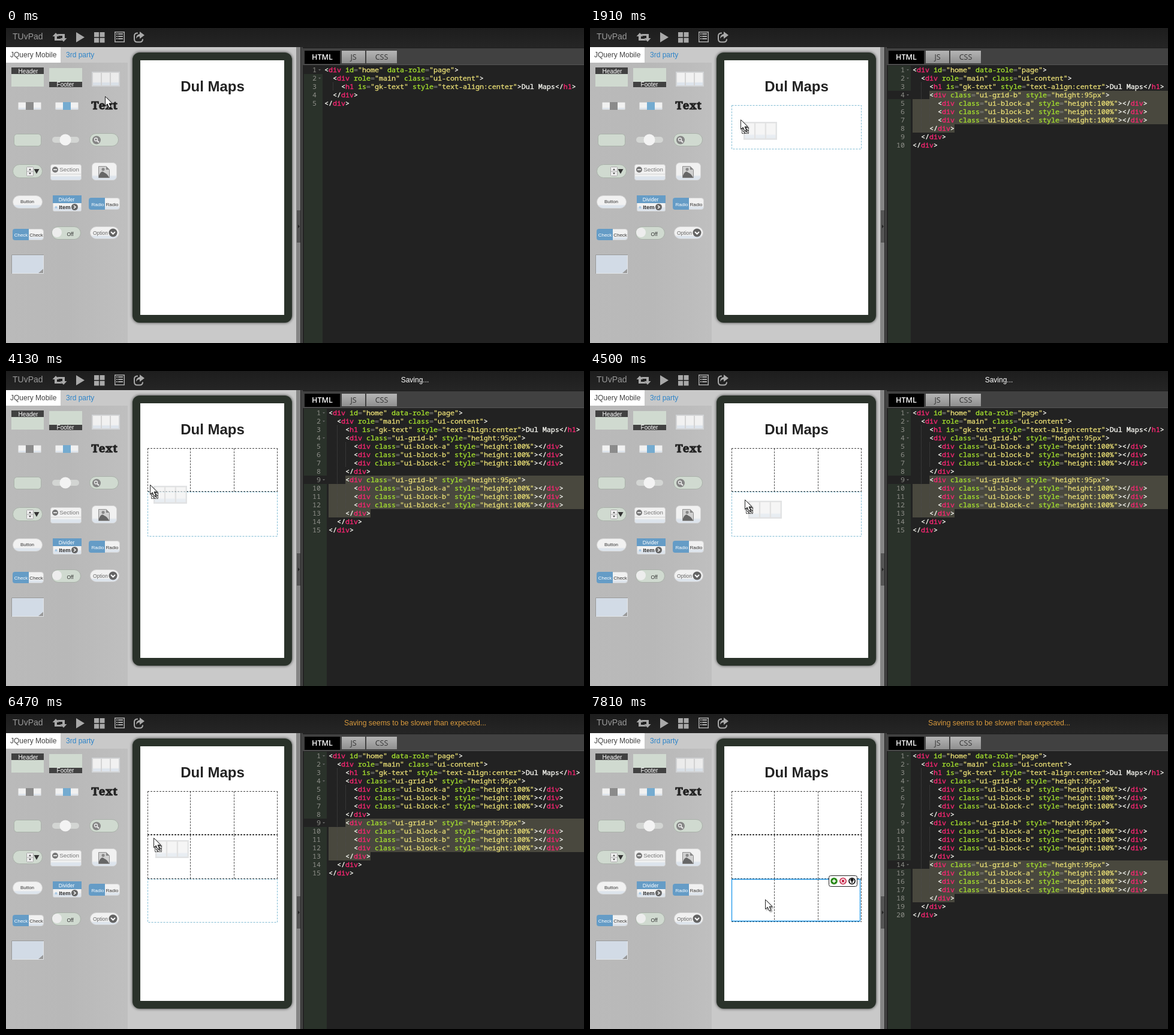
These frames come from a looping animation (964 by 527 pixels, 8 s). An HTML page:

```html
<!DOCTYPE html>
<html lang="en">
<head>
<meta charset="utf-8">
<title>App builder</title>
<style>
  html, body { margin: 0; width: 100%; height: 100%; overflow: hidden; background: #222; }
  svg { display: block; }
  text { font-family: "Liberation Sans", Arial, sans-serif; font-size: 12px; white-space: pre; }
  .mid { text-anchor: middle; }
  .small text { font-size: 8px; text-anchor: middle; fill: #333; }
  .small .light { fill: #fff; }
  .field { fill: #d0dad0; stroke: #a9b1a9; }
  .plate { fill: url(#plate); stroke: #d4d4d4; }
  .blue { fill: #659cc6; }
  .dark { fill: #414141; }
  .tab { font: 12.5px "Open Sans", "DejaVu Sans", sans-serif; }
  .code text { --ink: #f8f8f2; font: 11.667px "Noto Sans Mono", "DejaVu Sans Mono", monospace; }
  .code text, .code tspan { fill: var(--ink); stroke: var(--ink); stroke-width: .35px; }
  .code .num { --ink: #8f908a; stroke: none; text-anchor: end; }
  .code .tag { --ink: #f92672; }
  .code .attr { --ink: #a6e22e; }
  .code .eq { --ink: #858580; }
  .code .str { --ink: #e6db74; }
  .dash { fill: none; stroke: #444; stroke-dasharray: 3 2; }
  .preview { fill: none; stroke: #80bbd3; stroke-dasharray: 3 2; }
</style>
</head>
<body>
<svg width="964" height="527" viewBox="0 0 964 527">
  <defs>
    <linearGradient id="plate" x2="0" y2="1">
      <stop offset=".7" stop-color="#f1f1f1"/><stop offset=".8" stop-color="#dde4ec"/>
    </linearGradient>
    <linearGradient id="panel" x2="1" y2="0">
      <stop stop-color="#bababa"/><stop offset=".5" stop-color="#b8b8b8"/><stop offset="1" stop-color="#bfbfbf"/>
    </linearGradient>
    <linearGradient id="bar" x2="0" y2="1">
      <stop stop-color="#1d1d1d"/><stop offset="1" stop-color="#252525"/>
    </linearGradient>
    <linearGradient id="button" x2="0" y2="1">
      <stop stop-color="#b5b5b5"/><stop offset="1" stop-color="#8f8f8f"/>
    </linearGradient>
    <filter id="shadow" x="-20%" y="-20%" width="150%" height="150%">
      <feDropShadow dx="0" dy="0" stdDeviation="2.5" flood-opacity=".75"/>
    </filter>
    <filter id="soft" x="-30%" y="-30%" width="180%" height="180%">
      <feDropShadow dx="2" dy="2" stdDeviation="1.2" flood-opacity=".45"/>
    </filter>
    <g id="columns">
      <path d="M0 0h47v25H0z" fill="#d0d3d6"/>
      <path class="plate" d="M1.5 1.5h14v22h-14zM16.5 1.5h14v22h-14zM31.5 1.5h14v22h-14z"/>
    </g>
  </defs>

  <!-- Widget palette -->
  <path d="M203 31h282v496H203z" fill="#c9c9c9"/>
  <path d="M0 31h203v496H0z" fill="url(#panel)"/>
  <path d="M91 32h112v26H91z" fill="#c9c9c9"/>
  <path d="M0 32h91v26H0z" fill="#fff"/>
  <text x="7" y="49" fill="#444">JQuery Mobile</text>
  <text x="100" y="49" fill="#2f85c9">3rd party</text>

  <!-- Top bar -->
  <path d="M0 0h964v32H0z" fill="url(#bar)"/>
  <text x="11" y="19" fill="#9a9a9a" style="font-size:14px">TUvPad</text>
  <g fill="#a9a9a9">
    <path d="M83 8l-5.5 6H81v7h13l-3-3h-6v-4h3.5zM96 23l5.5-6H98v-7H85l3 3h6v4h-3.5z"/>
    <path d="M117 7l14 8.5-14 8.5z"/>
    <path d="M147 7h8v8h-8zM156.5 7h8v8h-8zM147 16.5h8v8h-8zM156.5 16.5h8v8h-8z"/>
    <path d="M181 6h17v18h-17zM182.5 7.5v15h14v-15z" fill-rule="evenodd"/>
    <path d="M184 9h2v2h-2zM187 9h8v2h-8zM184 13h2v2h-2zM187 13h8v2h-8zM184 17h2v2h-2zM187 17h8v2h-8z"/>
    <path d="M223 6l8 6-8 6v-4q-4 0-6 4 0-7 6-8z"/>
    <path d="M220 8.5h-2q-4 1-4 5v5q0 5 5 5h4q5 0 5-5" fill="none" stroke="#a9a9a9" stroke-width="2"/>
  </g>

  <g class="small">
    <path d="M9 66h54v32H9zM72 67h55v31H72z" fill="#d0dad0"/>
    <path class="dark" d="M9 66h54v11H9zM72 90h55v9H72z"/>
    <text class="light" x="37" y="76" style="font-size:10px">Header</text>
    <text class="light" x="99" y="98" style="font-size:10px">Footer</text>

    <rect class="plate" x="20.5" y="124.5" width="38" height="12" rx="1"/>
    <rect class="plate" x="82.5" y="124.5" width="38" height="12" rx="1"/>
    <path d="M33 124h13v13H33z" fill="#8b8b8b"/>
    <path d="M95 124h13v13H95z" fill="#74abd0"/>
    <text x="164.5" y="136" style="font:900 18.5px 'Noto Serif','DejaVu Serif',serif;fill:#222;stroke:#222;letter-spacing:.6px">Text</text>

    <rect class="field" x="13.5" y="177.5" width="45" height="20" rx="5"/>
    <rect x="77" y="182" width="45" height="10" rx="5" fill="#d3d5d3"/>
    <circle cx="99" cy="187" r="9.5" fill="#f3f3f3"/>
    <rect class="field" x="139.5" y="176.5" width="48" height="21" rx="10.5"/>
    <circle cx="151" cy="187.5" r="7" fill="#858585"/>
    <path d="M152 188.5l3 3" stroke="#eee" stroke-width="2"/>
    <circle cx="150" cy="186.5" r="2.5" fill="none" stroke="#eee" stroke-width="1.3"/>

    <rect class="field" x="11.5" y="228.5" width="49" height="22" rx="11"/>
    <rect x="34.5" y="232.5" width="11" height="15" rx="1" fill="#eee" stroke="#aaa"/>
    <path d="M34 240h12" stroke="#aaa"/>
    <path d="M38 238l2-3 2 3zM38 242l2 3 2-3z" fill="#555"/>
    <path d="M46.5 236h9l-4.5 8z" fill="#333"/>
    <rect class="plate" x="74.5" y="228.5" width="51" height="26" rx="3"/>
    <path d="M75 244.5h50" stroke="#d4d4d4"/>
    <circle cx="82" cy="237" r="5" fill="#777"/>
    <path d="M79 237h6" stroke="#fff" stroke-width="1.5"/>
    <text x="105.5" y="240" style="font-size:9.8px;fill:#777">Section</text>
    <rect class="plate" x="143.5" y="225.5" width="41" height="29" rx="6"/>
    <path d="M154.5 231.5h12l6 6v13h-18z" fill="#d0d0d0" stroke="#8f8f8f"/>
    <path d="M155 250v-3q4-10 9-5 4 1 8 8z" fill="#666"/>
    <circle cx="162" cy="236.5" r="2.5" fill="#888"/><path d="M167 231v6h6z" fill="#888"/>

    <rect class="plate" x="11.5" y="280.5" width="49" height="21" rx="10.5"/>
    <text x="35.5" y="293">Button</text>
    <rect class="plate" x="78.5" y="280.5" width="47" height="26" rx="2"/>
    <path class="blue" d="M78 280h48v13H78z"/>
    <text class="light" x="101" y="290" style="font-size:8.5px">Divider</text>
    <circle cx="83.5" cy="300" r="2" fill="#a9c9e4"/>
    <text x="98" y="303" style="font-size:9.5px;font-weight:bold">Item</text>
    <circle cx="114.5" cy="299.5" r="5.5" fill="#666"/>
    <path d="M113 297l3 2.5-3 2.5" fill="none" stroke="#fff" stroke-width="1.5"/>
    <rect class="plate" x="138.5" y="284.5" width="51" height="19" rx="4"/>
    <path class="blue" d="M165 284v20h-23q-4 0-4-4v-12q0-4 4-4z"/>
    <text class="light" x="153" y="298">Radio</text><text x="177" y="298">Radio</text>

    <rect class="plate" x="11.5" y="336.5" width="51" height="18" rx="4"/>
    <path class="blue" d="M38 336v19H15q-4 0-4-4v-11q0-4 4-4z"/>
    <text class="light" x="25" y="349">Check</text><text x="50.5" y="349">Check</text>
    <rect class="field" x="76.5" y="332.5" width="48" height="21" rx="10.5"/>
    <circle cx="85" cy="342" r="8" fill="#ededed"/>
    <text x="107" y="348" style="font-size:8.5px">Off</text>
    <rect class="plate" x="140.5" y="332.5" width="48" height="20" rx="10"/>
    <text x="157.5" y="346" style="font-size:8.5px;fill:#666">Option</text>
    <circle cx="178.5" cy="342.5" r="7" fill="#646464"/>
    <path d="M175 341l3.5 3.5 3.5-3.5" fill="none" stroke="#fff" stroke-width="2"/>

    <path d="M9.5 379.5h53v31h-53z" fill="#d2dbe6" stroke="#e2e5e8"/>
    <path d="M9.5 411v-31.5H63" fill="none" stroke="#999"/>
    <path d="M62 403v7h-8z" fill="#999"/>
  </g>

  <!-- Phone -->
  <rect x="211" y="41" width="266" height="452" rx="12" fill="#29332a" filter="url(#shadow)"/>
  <path d="M224 54h240v426H224z" fill="#fff"/>
  <text class="mid" x="344.5" y="106" fill="#222" style="font-size:24px;font-weight:bold">Dul Maps</text>

  <!-- Splitter and editor -->
  <path d="M484 32h7v495h-7z" fill="#858585"/>
  <path d="M485 305h6v54h-6z" fill="#555"/>
  <path d="M487 329l3 3-3 3z" fill="#222"/>
  <path d="M491 32h473v495H491z" fill="#222"/>
  <path d="M492 32h3v495h-3z" fill="#444"/>
  <path d="M495 34h469v28H495z" fill="#414141"/>
  <path d="M498 38h59v22h-59z" fill="#000"/>
  <path d="M560 38h39v21h-39zM601 38h51v21h-51z" fill="url(#button)"/>
  <text class="tab mid" x="527.5" y="53" fill="#fff" style="font-weight:600">HTML</text>
  <text class="tab mid" x="579.5" y="53" fill="#333">JS</text>
  <text class="tab mid" x="626.5" y="53" fill="#333">CSS</text>
  <path d="M496 61.5h468" stroke="#555"/>

  <g class="code" id="code"></g>
  <g id="stage"></g>
</svg>
<script>
const LOOP = 8000, FRAME = 60;
// One entry per dropped grid, in ms; dx and dy place the drag image.
const drops = [
  { drag: 1490, preview: 1790, code: 1850, drop: 2500, select: 2560, dx: 5, dy: 4 },
  { drag: 3770, preview: 4010, code: 4070, drop: 5100, select: 5220, dx: 6, dy: 2 },
  { drag: 6170, preview: 6410, code: 6530, drop: 7680, select: 7810, dx: 3, dy: 4 },
];
// Pointer path: time, x, y
const path = [
  [0, 165, 114], [540, 165, 114], [840, 167, 89], [1430, 167, 89], [1970, 262, 161],
  [2830, 262, 161], [3070, 204, 106], [3430, 182, 94], [3710, 182, 94], [4130, 240, 190],
  [4490, 258, 215], [5550, 258, 215], [5910, 184, 89], [6110, 184, 89], [6470, 246, 207],
  [6950, 291, 286], [7030, 291, 286], [7150, 292, 310], [LOOP, 292, 310],
];
const moveStarts = [0, 600, 1370, 2890, 3770, 5550, 6170, 7090];
const tops = [129, 202, 276, 348];

const escape = s => s.replace(/</g, '&lt;');
const span = (cls, s) => `<tspan class="${cls}">${s}</tspan>`;
const TOKEN = /(<\/?)(\w+)|("[^"]*")|([\w-]+)(?==)|(=)/g;
const highlight = line => line.replace(TOKEN, (all, open, tag, str, attr) =>
  tag ? escape(open) + span('tag', tag) : str ? span('str', str) : attr ? span('attr', attr) : span('eq', '='));

function source(count) {
  const grid = ['    <div class="ui-grid-b" style="height:95px">',
    ...['a', 'b', 'c'].map(c => `      <div class="ui-block-${c}" style="height:100%"></div>`),
    '    </div>'];
  return ['<div id="home" data-role="page">', '  <div role="main" class="ui-content">',
    '    <h1 is="gk-text" style="text-align:center">Dul Maps</h1>',
    ...Array(count).fill(grid).flat(), '  </div>', '</div>'];
}

function drawCode(count) {
  const lines = source(count), wide = lines.length > 9 ? 7 : 0, left = 531 + wide;
  const first = count ? 5 * count - 2 : 0;
  const box = (x, row, w, h, fill) =>
    `<rect x="${x}" y="${63 + 14 * row}" width="${w}" height="${14 * h}" fill="${fill}"/>`;
  let out = `<rect x="497" y="63" width="${31 + wide}" height="464" fill="#2a322a"/>`
    + box(497, first, 31 + wide, 1, '#222');
  if (count) {
    out += box(left + 28, first, 964, 1, '#49483e') + box(left, first + 1, 964, 3, '#49483e')
      + box(left, first + 4, 70, 1, '#49483e');
  }
  lines.forEach((line, row) => {
    const y = 74 + 14 * row, indent = line.search(/\S/);
    for (let k = 2; k < indent; k += 2) {
      out += `<path d="M${left + 7 * k + .5} ${y - 11}v14" stroke="#4a4a4a" stroke-dasharray="1 1"/>`;
    }
    out += `<text class="num" x="${518 + wide}" y="${y}">${row + 1}</text>`
      + `<text x="${left + 7 * indent}" y="${y}">${highlight(line.trim())}</text>`;
    if (row < 2 || /grid/.test(line)) out += `<path d="M${521 + wide} ${y - 5}h4l-2 2.5z" fill="#666"/>`;
  });
  return out;
}

function drawGrid(i) {
  const top = tops[i] + .5, bottom = tops[i + 1] - .5;
  return `<path class="dash" d="M236 ${top}h217M236 ${bottom}h217`
    + [236, 307, 380, 452].map(x => `M${x + .5} ${top}V${bottom}`).join('') + '"/>';
}

function drawSelection(i) {
  const y = tops[i], icons = [['#2d8a1c', 'M-3 0h6M0-3v6'], ['#c2183c', 'M-2-2l4 4M2-2l-4 4'], ['#000', 'M0 3v-6M-2.5-1L0-3.5 2.5-1']];
  return `<rect x="236.5" y="${y + .5}" width="214" height="${tops[i + 1] - y - 2}" rx="1" fill="none" stroke="#1c97ea" stroke-width="1.3"/>
    <rect x="398.5" y="${y - 5.5}" width="47" height="18" rx="3" fill="#fff" stroke="#222"/>`
    + icons.map(([color, mark], k) => `<g transform="translate(${407 + 15 * k} ${y + 3.5})">
      <circle r="5" fill="${k ? '#fff' : color}" stroke="${color}" stroke-width="1.6"/>
      <path d="${mark}" fill="none" stroke="${k ? color : '#fff'}" stroke-width="1.8"/></g>`).join('');
}

const ARROW = `<path d="M.5 .5v16l3.7-3.5 2.7 6.3 2.8-1.2-2.7-6H12z" fill="#fff" stroke="#222" filter="url(#soft)"/>`;
const HAND = `<path d="M-2 12V2q0-2 1.5-2T1 2v5q2-1.5 3 .5 2-1 3 .8 3-.8 3 2v5q0 3-2 4v2H-1v-2l-5-7q-.5-2.5 1.5-2z" fill="#fff" stroke="#111" filter="url(#soft)"/>
  <path d="M1.5 13v4M4 13v4M6.5 13v4" stroke="#111"/>`;
const BADGE = `<path d="M2.5 13.5h11v10h-11z" fill="#fff" stroke="#111" stroke-dasharray="2 1"/>
  <path d="M4 15l8 7M4 19l4 4M8 15l5 4" stroke="#333" stroke-width="1.3"/>`;

function pointerAt(t) {
  const start = moveStarts.filter(s => s <= t).pop();
  const held = t - (t - start) % FRAME;
  const k = Math.max(1, path.findIndex(p => p[0] > held));
  const [t0, x0, y0] = path[k - 1], [t1, x1, y1] = path[k];
  const p = (held - t0) / (t1 - t0);
  return [Math.round(x0 + (x1 - x0) * p), Math.round(y0 + (y1 - y0) * p)];
}

function drawStage(t) {
  const [x, y] = pointerAt(t);
  const count = drops.filter(d => t >= d.drop).length;
  const drag = drops.find(d => t >= d.drag && t < d.drop);
  const over = x > 143 && x < 190 && y > 73 && y < 99;
  let out = `<use href="#columns" x="143" y="73" opacity="${over || drag ? 1 : .9}"/>`;
  for (let i = 0; i < count; i++) out += drawGrid(i);
  if (count && !drag && t >= drops[count - 1].select) out += drawSelection(count - 1);
  if (drag && t >= drag.preview) {
    out += `<rect class="preview" x="236.5" y="${tops[count] + .5}" width="216" height="${tops[count + 1] - tops[count]}"/>`;
  }
  if (t >= 5730) out += '<text class="mid" x="682.5" y="19" fill="#d99a3d" style="font-size:12.25px">Saving seems to be slower than expected...</text>';
  else if (t >= 2950) out += '<text class="mid" x="682" y="19" fill="#fff">Saving...</text>';
  if (t >= 1370 && t < 1490) {
    out += `<g opacity="${t < 1430 ? .6 : .9}"><rect x="165" y="109" width="53" height="21" fill="#c4c4c4" filter="url(#soft)"/>
      <text class="mid" x="191" y="124" fill="#777" style="font:13px 'Open Sans',sans-serif">&lt;grid&gt;</text></g>`;
  }
  if (drag) {
    out += `<use href="#columns" transform="translate(${x + drag.dx} ${y + drag.dy}) scale(1.19 1.2)" opacity=".65"/>`;
  }
  return out + `<g transform="translate(${x} ${y})">${drag ? BADGE + ARROW : over ? HAND : ARROW}</g>`;
}

const shown = {};
function show(id, markup) {
  if (shown[id] !== markup) document.getElementById(id).innerHTML = shown[id] = markup;
}

function tick() {
  const t = performance.now() % LOOP;
  show('code', drawCode(drops.filter(d => t >= d.code).length));
  show('stage', drawStage(t));
  requestAnimationFrame(tick);
}
tick();
</script>
</body>
</html>
```
